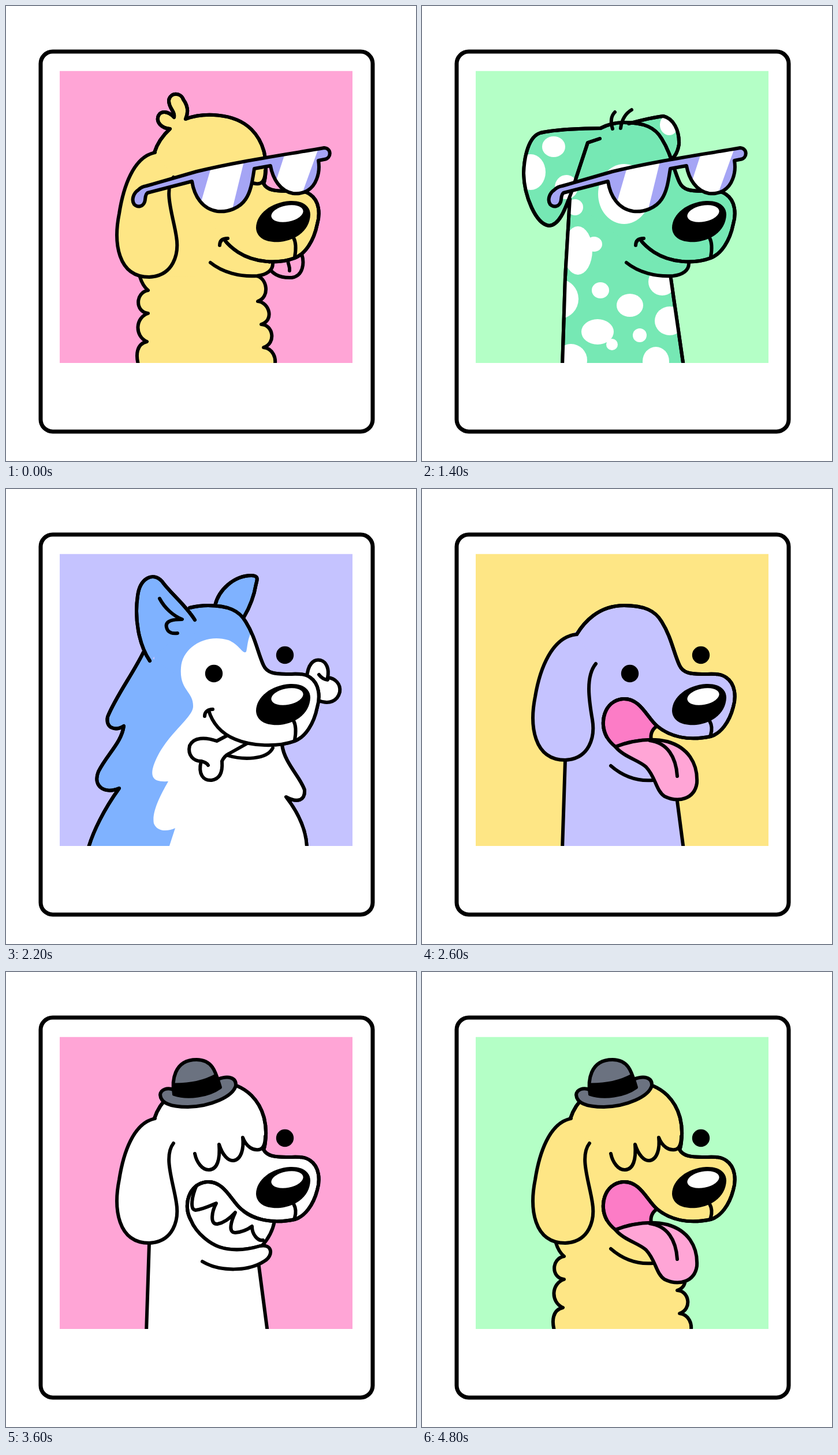
An HTML page for the animation above (5000 ms loop, 710 by 789 pixels).

```html
<!DOCTYPE html>
<html lang="en">
<head>
<meta charset="utf-8">
<title>Dog portraits</title>
<style>
html, body { margin: 0; width: 100%; height: 100%; overflow: hidden; background: #fff; }
svg { display: block; width: 100vw; height: 100vh; }
</style>
</head>
<body>
<svg viewBox="0 0 710 789">
  <defs>
    <clipPath id="photo"><rect x="93" y="112.5" width="507" height="506.5"/></clipPath>
    <linearGradient id="heat" x1="0" y1="0" x2="0" y2="1">
      <stop offset="0" stop-color="#fee77f"/><stop offset=".65" stop-color="#fdc998"/>
    </linearGradient>
  </defs>
  <rect x="60" y="79" width="575" height="659" rx="21" fill="#fff" stroke="#000" stroke-width="7"/>
  <g clip-path="url(#photo)">
    <g id="dog" fill="none" stroke="#000" stroke-width="6" stroke-linecap="round" stroke-linejoin="round"></g>
  </g>
</svg>
<script>
const color = {
  pink: '#ffa5d6', hot: '#fc7cc6', yellow: '#fee685', sky: '#99e2ff', green: '#b4ffc6',
  mint: '#76e8b4', lilac: '#c5c3ff', blue: '#7fb2ff', white: '#fff', fire: 'url(#heat)'
};

const path = (d, fill = 'none', more = '') => `<path d="${d}" fill="${fill}" ${more}/>`;
const flat = (d, fill) => path(d, fill, 'stroke="none"');
const oval = (x, y, rx, ry = rx, fill = '#000', turn = 0) =>
  `<ellipse cx="${x}" cy="${y}" rx="${rx}" ry="${ry}" fill="${fill}" stroke="none" transform="rotate(${turn} ${x} ${y})"/>`;

// Head outline pieces, running from the crown to the corner of the mouth
const tuft = 'C270,212 259,202 264,190C268,182 280,181 291,193C293,182 281,177 282,163C285,149 303,150 307,162C315,173 316,185 311,196';
const smooth = 'C385,202 404,211 415,230C432,257 436,285 446,306';
const crown = {
  fluffy: t => 'M257,254C262,238 272,224 284,213' + (t === 'tuft' ? tuft : 'C290,203 300,198 311,196') +
    'C340,185 395,184 425,214C446,235 453,265 449,295Q448,304 446,308',
  drop: () => 'M268,252C280,232 305,202 350,202' + smooth,
  fold: () => 'M309,212Q328,202 350,202' + smooth,
  wolf: () => 'M318,206Q334,202 350,202' + smooth
};
const muzzle = 'C452,319 465,321 485,321C505,321 516,319 527,327C543,338 544,361 539,378';
const lip = 'C390,397 378,362 348,364C316,367 306,405 320,430';
const openMouth = 'C532,405 517,424 500,429C462,437 430,430 407,411' + lip;
const closedMouth = 'C533,408 518,430 500,437C470,448 430,445 402,427C390,419 383,412 378,405';
const longMouth = 'C533,408 518,430 500,437C470,448 425,446 397,434C372,424 357,405 351,384';

const ear = {
  fluffy: 'M258,254C220,262 203,315 196,360C186,410 193,470 248,470C290,468 300,430 295,400C290,365 272,320 290,297',
  drop: 'M268,252C225,256 204,312 196,360C186,410 193,470 248,470C290,468 300,430 295,400C289,365 283,325 301,303',
  fold: 'M309,212C280,212 230,214 205,220C185,226 177,260 176,290C177,330 197,378 220,381C240,380 250,345 258,325L287,237L308,230',
  wolf: 'M249,298C230,270 222,225 228,185C232,155 254,143 270,160C285,181 310,200 327,227'
};
const farEar = {
  fold: 'M358,204C380,198 400,193 418,191C435,195 446,215 445,240Q442,258 432,266',
  wolf: 'M362,202C368,175 395,150 425,150C438,150 435,158 433,165Q428,195 412,222'
};
const ruff = 'M238,283C220,320 190,360 176,395C172,415 190,420 204,411C200,440 175,460 160,490C150,515 170,530 196,519C170,555 150,595 142,625' +
  'L521,625C521,590 505,560 485,534C505,545 518,540 517,522C510,500 482,475 478,444';

function neckShape(kind, open) {
  if (kind === 'ruff') return ruff;
  if (kind === 'plain') return 'M256,335L248,470L243,625L453,625L' + (open ? '437,503' : '430,466');
  return 'M232,470C235,480 240,488 246,493C224,497 223,530 246,533C224,540 222,572 244,582C226,586 224,605 230,625' +
    'L465,625C469,610 462,594 446,592C468,585 463,553 442,552C465,545 456,514 436,512' +
    (open ? '' : 'C458,505 452,470 433,468');
}

const spots = [[228,244,20,18], [188,288,26,31], [250,314,20,21], [428,206,16,18], [350,326,45,52],
  [265,349,14,14], [270,424,25,42], [298,413,14,13], [238,508,33,34], [309,493,15,14], [360,519,23,20],
  [304,565,28,22], [329,587,10,10], [377,571,12,12], [429,546,26,25], [416,478,24,24], [258,614,28,28], [405,616,23,25]];
const mask = 'M424,250C418,262 418,275 416,282C410,288 405,270 385,262C345,250 305,275 303,310C300,350 325,350 324,378C322,400 270,430 254,485' +
  'C250,505 262,508 281,507C268,530 252,560 256,580C262,595 280,594 293,588L281,625H600V250Z';

const flames =
  flat('M93,343C105,330 97,322 114,313C105,335 150,345 154,378C148,395 137,405 140,425C152,420 160,430 160,438C170,442 175,430 188,432' +
    'L243,460V580C220,582 213,570 224,550C232,535 225,520 213,515C205,535 190,535 183,520C185,500 175,505 165,481C168,500 165,518 145,525' +
    'C125,528 110,520 122,490C130,465 125,445 111,433C115,450 112,465 93,475Z', color.yellow) +
  flat('M600,385C580,385 578,370 577,355C577,375 562,382 566,395C582,405 575,430 553,425C540,445 535,425 522,430C505,420 520,405 524,395' +
    'L440,440V510C455,528 485,525 495,505C502,495 506,485 508,474C519,490 517,505 522,520C540,532 552,512 560,535C548,570 570,582 600,575Z', color.yellow) +
  flat('M566,310C557,325 546,328 553,341C562,350 576,344 574,330Q566,322 566,310Z', color.yellow) +
  flat('M167,401C163,412 155,415 160,422C167,427 176,423 174,414Z', color.yellow) +
  flat('M546,386C545,396 535,398 540,405C548,410 558,406 557,397Z', color.yellow);

// Each mouth: outline ending, parts behind the muzzle, parts in front
const chin = coat => path('M354,445C375,462 405,470 435,468C452,466 462,458 462,447', coat);
const corner = path('M370,415C370,406 376,403 384,403');
const rainbow = [
  ['pink', 'M329,444C360,431 390,433 415,439C435,446 445,451 470,446C505,439 500,472 522,480C538,485 552,482 551,498C543,522 553,527 566,537C577,551 562,565 561,582C561,596 572,602 573,625'],
  ['yellow', 'M336,457C365,446 395,449 418,457C440,467 445,467 468,462C494,458 488,483 506,491C520,496 530,496 531,509C524,528 533,535 542,542C554,556 540,566 539,582C540,598 549,605 550,625'],
  ['green', 'M346,472C370,468 395,469 412,475C435,488 443,490 460,483C478,478 475,503 493,507C508,511 510,518 507,530C504,544 513,547 520,555C528,568 516,574 516,588C517,602 527,610 526,625']
];
const stream = 'L502,625C500,610 490,595 497,580C502,564 481,562 484,545C488,530 462,528 457,512C420,505 385,500 354,478Z';
const teethEdge = 'C330,455 355,472 370,477C395,485 420,481 ';

const mouths = {
  smile: { line: closedMouth, front: coat => chin(coat) + corner },
  lick: {
    line: closedMouth,
    back: path('M453,443C455,465 475,472 495,471C515,468 517,445 512,430', color.pink),
    front: coat => chin(coat) + corner + path('M488,441C489,450 492,452 491,459')
  },
  bone: {
    line: longMouth,
    back: path('M521,328C522,305 532,294 545,297C555,300 560,312 557,327C570,328 580,338 578,352C574,368 560,374 541,367', '#fff') +
      path('M557,331Q548,330 542,322'),
    front: () => path('M384,462C410,470 452,470 462,449', '#fff') +
      path('M382,428L365,437C345,430 325,430 318,445C314,462 325,472 338,472C332,495 342,506 356,505C378,502 374,475 374,472Q378,463 386,459L418,441', '#fff') +
      path('M338,472Q347,474 350,479') + path('M344,394C344,386 350,382 358,382')
  },
  pant: {
    line: openMouth, open: true,
    front: () => path('M407,411' + lip + 'Q326,440 335,447C360,437 380,435 397,436C395,425 398,417 407,411', color.hot) +
      path('M327,480C350,500 375,507 400,505') +
      path('M335,447C370,434 400,432 425,438C460,448 478,475 476,510C472,537 445,545 420,533C405,523 405,500 388,482C375,470 350,465 335,447', color.pink) +
      path('M394,436C425,440 440,465 442,498')
  },
  rainbow: {
    line: openMouth, open: true,
    front: coat => path('M412,417L407,411' + lip + 'L329,444L411,440Z', '#000') +
      rainbow.map(([c, d]) => path(d + stream, color[c])).join('') +
      path('M320,430C328,452 346,477 375,491C400,503 425,505 448,504C462,508 459,527 438,530C410,534 380,530 357,516', coat)
  },
  grin: {
    line: openMouth, open: true,
    front: coat => path('M465,432C440,431 420,424 407,411' + lip + teethEdge + '443,475C455,462 462,448 465,432Z', '#fff') +
      path('M330,370C322,388 318,412 328,413C340,412 352,406 364,401C357,414 352,438 366,437C378,435 388,427 397,417C390,432 384,452 397,452C408,451 418,447 426,441C426,455 436,467 445,465') +
      path('M320,430' + teethEdge + '440,475C462,471 463,492 448,501C420,520 370,520 340,502', coat)
  }
};

const hat = path('M290,204C280,200 268,203 267,213C268,228 285,234 315,234C355,233 393,216 398,197C399,183 385,179 367,186Z', '#6b7280') +
  path('M291,212C287,190 290,152 330,152C360,152 364,178 371,200C350,215 315,220 291,212', '#6b7280') +
  path('M293,194C320,194 345,188 363,178L370,201C350,212 315,217 292,212Z', '#000', 'stroke-width="3"');
const horn = coat => path('M322,228C295,226 277,212 280,183C278,176 270,178 267,182C250,200 248,230 262,248Q273,262 293,264', coat);
const farHorn = coat => path('M410,223C430,222 440,210 438,181C442,174 448,176 452,183C468,200 470,225 457,245Q448,257 430,261', coat);
const hairs = path('M330,213C326,200 328,190 334,184') + path('M344,212C346,196 353,186 363,180');
const fringe = path('M327,315C330,330 340,344 352,343C366,342 371,325 369,299C375,318 385,328 394,327C408,325 412,305 410,287C416,303 428,310 438,308Q449,306 449,285');
const nose = flat('M433,385C433,360 460,340 492,338C515,337 527,348 527,362C526,385 508,405 475,409C450,411 434,402 433,385', '#000') +
  oval(487, 360, 28, 14, '#fff', -11);

const frame = 'M243,312L330,287C400,270 470,260 551,246C564,247 564,264 551,266L541,268C543,280 542,290 538,300C531,319 515,327 497,325' +
  'C475,321 462,300 458,277L430,282C427,300 425,320 415,335C405,350 385,358 366,356C340,352 326,330 322,304L245,324C240,328 242,335 240,340' +
  'C237,348 228,350 222,344C217,337 220,325 229,319Q235,313 243,312Z';
const shades = `<clipPath id="lens">${path(frame)}</clipPath>` + flat(frame, '#a5a5f5') +
  `<g clip-path="url(#lens)">${flat('M358,270H412L390,360H332ZM485,250H540L511,330H459Z', '#fff')}</g>` + path(frame);

function draw([bg, coatName, head, neck, mouthName, eyes, top]) {
  const coat = color[coatName], mouth = mouths[mouthName], open = mouth.open;
  const outline = crown[head](top) + muzzle + mouth.line;
  const neckLine = neckShape(neck, open);
  const cheek = 'M350,215L309,212L258,254L256,335L248,470V495L' +
    (open ? '400,506L400,480L340,440L320,400L350,364Z' : '436,512L433,462L460,443L402,427L378,405Z');
  const far = farEar[head] || '';
  const out = [`<rect x="93" y="112.5" width="507" height="507" fill="${color[bg]}" stroke="none"/>`];
  if (bg === 'fire') out.push(flames);
  if (eyes === 'dots') out.push(oval(483, 288, 15.2));
  out.push(path(far, coat), top === 'horns' ? farHorn(coat) : '', mouth.back || '',
    flat(cheek, coat), path(neckLine, coat), path(outline, coat), path(ear[head], coat));

  if (head === 'fold' || head === 'wolf') {
    const marks = head === 'wolf' ? flat(mask, '#fff')
      : spots.map(([x, y, rx, ry]) => oval(x, y, rx, ry, coatName === 'white' ? '#000' : '#fff')).join('');
    const body = [far, neckLine, cheek, outline, ear[head]];
    out.push(`<clipPath id="body">${body.map(d => path(d)).join('')}</clipPath><g clip-path="url(#body)">${marks}</g>`,
      path(far), path(neckLine), path(ear[head]));
  }
  if (head === 'wolf')
    out.push(path('M266,190C275,207 290,220 305,226C290,226 275,228 278,240C280,250 290,251 297,250'));

  out.push(mouth.front(coat), path(outline), nose, path(`M498,402Q504,413 ${open ? '500,426' : '500,435'}`));
  if (head === 'fluffy') out.push(fringe);
  else if (eyes === 'dots') out.push(oval(360, 320, 15.2));
  if (eyes === 'shades') out.push(shades);
  out.push({ hat, hairs, horns: horn(coat) }[top] || '');
  return out.join('');
}

// background, coat, head, neck, mouth, eyes, top
const slides = `
pink yellow fluffy curly lick shades tuft
green hot drop plain smile dots none
lilac white fold plain pant dots hairs
sky yellow drop plain grin dots horns
sky white fluffy plain rainbow dots tuft
yellow blue wolf ruff bone dots none
pink sky fluffy curly pant dots hat
green mint fold plain smile shades hairs
lilac hot drop plain rainbow dots horns
yellow white fluffy curly lick dots tuft
pink mint fold plain grin dots hairs
lilac blue wolf ruff bone dots none
sky pink fluffy curly smile shades hat
yellow lilac drop plain pant dots none
pink white fold plain rainbow dots hairs
green sky fluffy curly pant dots tuft
lilac yellow drop plain lick shades none
sky blue wolf ruff smile shades none
pink white fluffy plain grin dots hat
green yellow fold plain smile dots hairs
fire hot drop plain grin dots horns
sky mint fold plain pant dots hairs
sky pink fluffy curly rainbow dots tuft
lilac blue wolf ruff smile dots none
green yellow fluffy curly pant dots hat`.trim().split('\n').map(row => draw(row.split(' ')));

const dog = document.getElementById('dog');
let shown = -1;
function tick() {
  const i = Math.floor(performance.now() % 5000 / 200);
  if (i !== shown) dog.innerHTML = slides[shown = i];
  requestAnimationFrame(tick);
}
tick();
</script>
</body>
</html>
```
